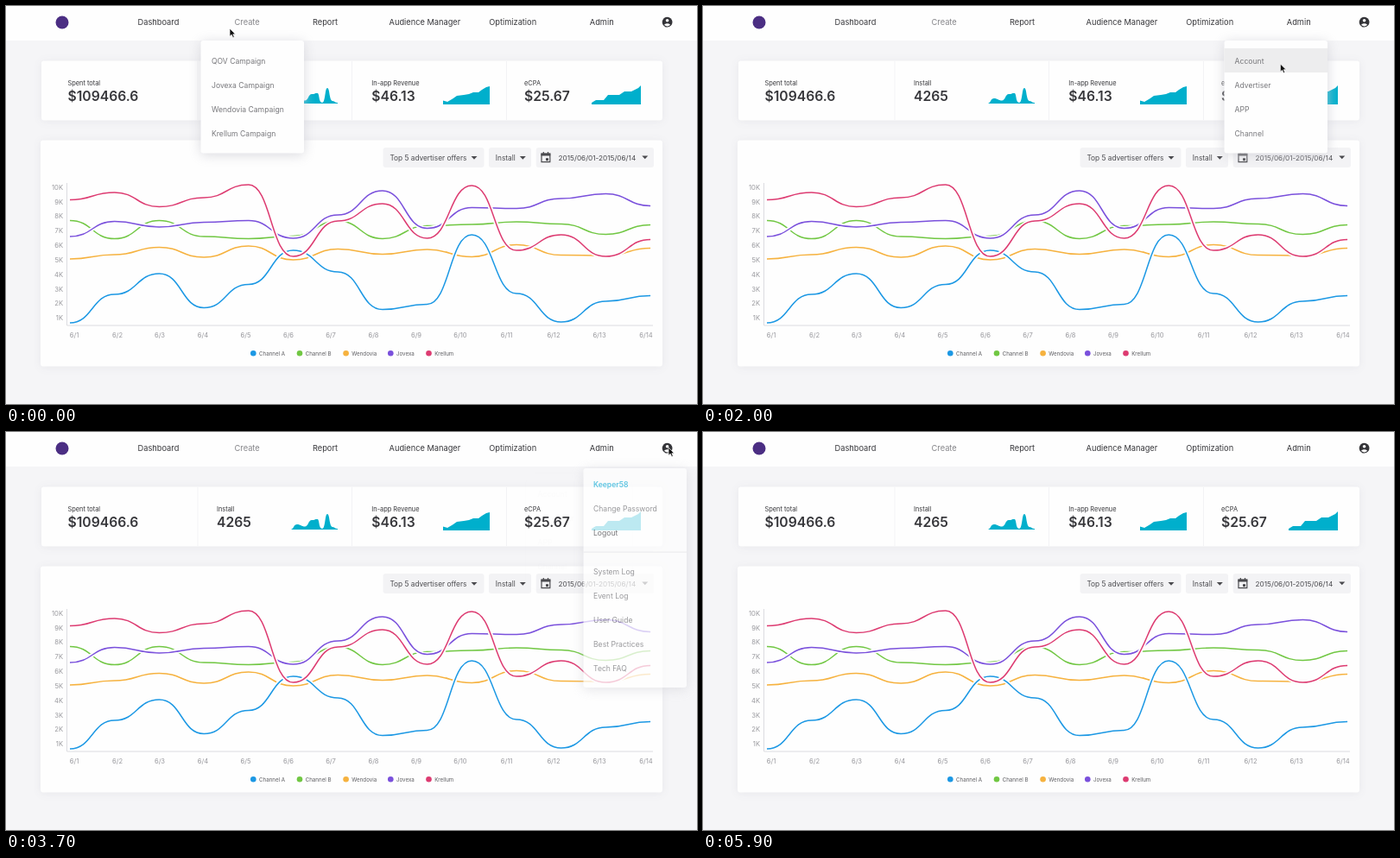
Write an HTML page that moves like this. It is 800 by 461 pixels and loops after 6000 ms.

```html
<!DOCTYPE html>
<html lang="en">
<head>
<meta charset="utf-8">
<title>Campaign dashboard</title>
<style>
  html, body { margin: 0; width: 100%; height: 100%; overflow: hidden; background: #f5f5f7; }
  svg { display: block; width: 800px; height: 461px; font-family: Inter, Roboto, sans-serif; }
  .card { fill: #fefefe; filter: drop-shadow(0 1px 5px rgba(60, 60, 80, .07)); }
  .panel { fill: #fefefe; filter: drop-shadow(0 2px 7px rgba(205, 205, 212, .75)); }
  .line { fill: none; stroke-width: 1.5; }
  .halo { fill: none; stroke: #fefefe; stroke-width: 5; }
</style>
</head>
<body>
<svg id="stage" viewBox="0 0 800 461"></svg>
<script>
const stage = document.getElementById('stage');
const LOOP = 6000, STEP = 100, FADE = 300;
const DARK = '#37373b', GREY = '#77777b', PALE = '#98989d', CYAN = '#00afcc';

function add(tag, attrs, parent = stage) {
  const node = document.createElementNS('http://www.w3.org/2000/svg', tag);
  for (const key in attrs) node.setAttribute(key, attrs[key]);
  return parent.appendChild(node);
}
function rect(x, y, width, height, attrs, parent) {
  return add('rect', { x, y, width, height, ...attrs }, parent);
}
function label(text, x, y, size, fill = DARK, attrs = {}, parent = stage) {
  add('text', { x, y, 'font-size': size, fill, ...attrs }, parent).textContent = text;
}
function path(d, attrs, parent) {
  return add('path', { d, ...attrs }, parent);
}
const caret = (x, y) => path(`M${x - 3.5} ${y - 1.7}h7l-3.5 3.6z`, { fill: '#4a4a4e' });

// Header
rect(0, 0, 800, 40, { fill: '#fefefe' });
add('circle', { cx: 65, cy: 19, r: 7.5, fill: '#4b2e83' });
[['Dashboard', 152.6], ['Create', 264.6], ['Report', 355], ['Audience Manager', 443.6],
 ['Optimization', 559.2], ['Admin', 675.8]].forEach(([text, x]) =>
  label(text, x, 22.2, 9.25, text === 'Create' ? '#858589' : DARK));
add('circle', { cx: 765.6, cy: 18.7, r: 5.9, fill: '#343438' });
add('circle', { cx: 765.6, cy: 16.8, r: 1.8, fill: '#fff' });
path('M762 21.7q3.6 -2.9 7.2 0q-3.6 3.4 -7.2 0z', { fill: '#fff' });

// Summary cards
rect(41, 63.5, 719, 69, { rx: 3, class: 'card' });
[222, 400.5, 579.5].forEach(x => rect(x - .5, 64, 1, 68, { fill: '#f3f3f5' }));
[['Spent total', '$109466.6', 71.5], ['Install', '4265', 244],
 ['In-app Revenue', '$46.13', 423.3], ['eCPA', '$25.67', 600]].forEach(([name, value, x]) => {
  label(name, x, 92.2, 7.4);
  label(value, x, 110.4, 15.7, DARK, { 'font-weight': 600 });
});
path('M330 113C334 111 333 107 337 107S342 109.5 346 109.5S350 102 354 102S358 100.5 361 101' +
  'C363 103 362 112 366 112S369 95 372 95S374 109 378 110S381 112 384 112V113Z', { fill: CYAN });
path('M506 114V109.5L511 111L517 107.5L522 104L530 103L536 102L541 100H547L551 97L556 94L560 93V114Z', { fill: CYAN });
path('M678 114V112L683 109H692L697 103H710L716 99H724L728 97L732 95L735 92V114Z', { fill: CYAN });

// Chart card with its filters
rect(40, 155.5, 720, 262, { rx: 3, class: 'card' });
[[436.5, 117], [559, 49], [613.7, 136.3]].forEach(([x, w]) =>
  rect(x, 164, w, 23, { rx: 3, fill: '#f3f3f5' }));
label('Top 5 advertiser offers', 444.4, 178.6, 8.3, '#4a4a4e');
label('Install', 566.8, 178.6, 8.3, '#4a4a4e');
label('2015/06/01-2015/06/14', 639.6, 178.8, 8.2, '#4a4a4e');
caret(542, 175.8);
caret(598.3, 175.8);
caret(739.8, 175.3);
path('M620 171.2h9.8v9.4h-9.8zM622.3 169v2M627.5 169v2', { fill: 'none', stroke: '#4a4a4e', 'stroke-width': 1.2 });
rect(619.5, 170.7, 10.8, 2.8, { fill: '#4a4a4e' });
rect(625, 176.2, 3, 3, { fill: '#4a4a4e' });

// Axes
path('M70.5 205V370H749', { fill: 'none', stroke: '#dcdce0' });
for (let k = 1; k <= 10; k++)
  label(k + 'K', 66, 381.1 - 16.83 * k, 7.6, PALE, { 'text-anchor': 'end' });
[79, 129, 178, 228, 277.5, 327, 376, 425.5, 475, 526, 579.5, 634, 687, 741].forEach((x, i) =>
  label('6/' + (i + 1), x, 384.1, 7.6, PALE, { 'text-anchor': 'middle' }));

// Each series eases level into and out of its points
function curve(ys) {
  const at = i => 74 + 51.7 * i;
  return ys.map((y, i) => {
    if (!i) return `M${at(0)} ${y}`;
    const mid = at(i - .5);
    return `C${mid} ${ys[i - 1]} ${mid} ${y} ${at(i)} ${y}`;
  }).join('');
}
const series = [
  ['#71c743', [248.5, 269.5, 248.5, 267, 269.5, 266.5, 249, 269.5, 254.5, 253, 250, 252.5, 264.5, 253.5]],
  ['#f6b23f', [293, 288, 279.5, 291, 278, 294, 281.5, 287.5, 282, 290.5, 276.5, 288.5, 289, 280.5]],
  ['#7a50dc', [267, 249.5, 256, 250.5, 248.5, 269, 242, 214, 257.5, 233.5, 234.5, 223, 217.5, 231.5]],
  ['#1c98e4', [367, 334, 310, 349.5, 322.5, 283, 308, 351.5, 345.5, 265, 333, 366, 342, 335.5]],
  ['#dd3b71', [224.5, 216, 232.5, 222, 207, 290, 249, 229, 269, 208, 283, 265, 290, 270.5]]
];
series.forEach(([stroke, ys]) => {
  const d = curve(ys);
  path(d, { class: 'halo' });
  path(d, { class: 'line', stroke });
});
[['Channel A', 286.3, 3], ['Channel B', 340, 0], ['Wendovia', 393.6, 1],
 ['Jovexa', 445.3, 2], ['Krellum', 489.5, 4]].forEach(([name, x, i]) => {
  add('circle', { cx: x, cy: 402.2, r: 3.3, fill: series[i][0] });
  label(name, x + 6.7, 404.5, 6.2, '#5c5c60');
});

// Menus
function menu(x, height) {
  const group = add('g', { opacity: 0 });
  rect(x, 40, 119.5, height, { rx: 3, class: 'panel' }, group);
  return group;
}
function items(group, x, first, names) {
  names.forEach((name, i) => label(name, x, first + 28 * i + 3.1, 8.6, GREY, {}, group));
}
const createMenu = menu(225.5, 130.5);
items(createMenu, 238, 64, ['QOV Campaign', 'Jovexa Campaign', 'Wendovia Campaign', 'Krellum Campaign']);

const adminMenu = menu(603.5, 130.5);
const hover = rect(603.5, 0, 119.5, 28, { fill: '#ededee' }, adminMenu);
items(adminMenu, 615.6, 64, ['Account', 'Advertiser', 'APP', 'Channel']);

const userMenu = menu(668.5, 254);
label('Keeper58', 680, 62, 8.6, '#2cb6dc', { 'font-weight': 600 }, userMenu);
items(userMenu, 680, 87, ['Change Password']);
label('Logout', 680, 118.1, 8.6, '#48484c', {}, userMenu);
rect(668.5, 136.5, 119.5, 1, { fill: '#e6e6e8' }, userMenu);
items(userMenu, 680, 160, ['System Log', 'Event Log', 'User Guide', 'Best Practices', 'Tech FAQ']);

const cursor = path('M0 0V9.2L2.2 7.3L3.7 10.6L5.3 9.9L3.9 6.7H6.7Z',
  { fill: '#111', stroke: '#fff', 'stroke-width': .7 });

// Motion
const ease = p => { p = Math.min(1, Math.max(0, p)); return p * p * (3 - 2 * p); };
const moves = [ // start, end, x, y
  [0, 1200, 686, 20.5], [1600, 2550, 640, 142], [2900, 3600, 767, 18], [3850, 4200, 773, 18]
];
function pointer(t) {
  let x = 259, y = 26;
  for (const [start, end, toX, toY] of moves) {
    const p = ease((t - start) / (end - start));
    x += (toX - x) * p;
    y += (toY - y) * p;
  }
  return [x, y];
}
function show(group, t, open, close) {
  const o = ease((t - open) / FADE) * (1 - ease((t - close) / FADE));
  group.setAttribute('opacity', o);
  group.setAttribute('transform', `translate(0 ${(1 - o) * 8})`);
}
function draw() {
  const t = Math.floor(performance.now() % LOOP / STEP) * STEP;
  const [x, y] = pointer(t);
  show(createMenu, t, -FADE, 100);
  show(adminMenu, t, 1190, 3420);
  show(userMenu, t, 3500, 3900);

  const row = Math.floor((y - 49) / 28);
  const inside = x > 603 && x < 723 && row >= 0 && row < 4;
  hover.setAttribute('y', 49 + 28 * row);
  hover.setAttribute('visibility', inside ? 'visible' : 'hidden');

  cursor.setAttribute('transform', `translate(${x} ${y})`);
  cursor.setAttribute('visibility', t < 4300 ? 'visible' : 'hidden');
  requestAnimationFrame(draw);
}
draw();
</script>
</body>
</html>
```
